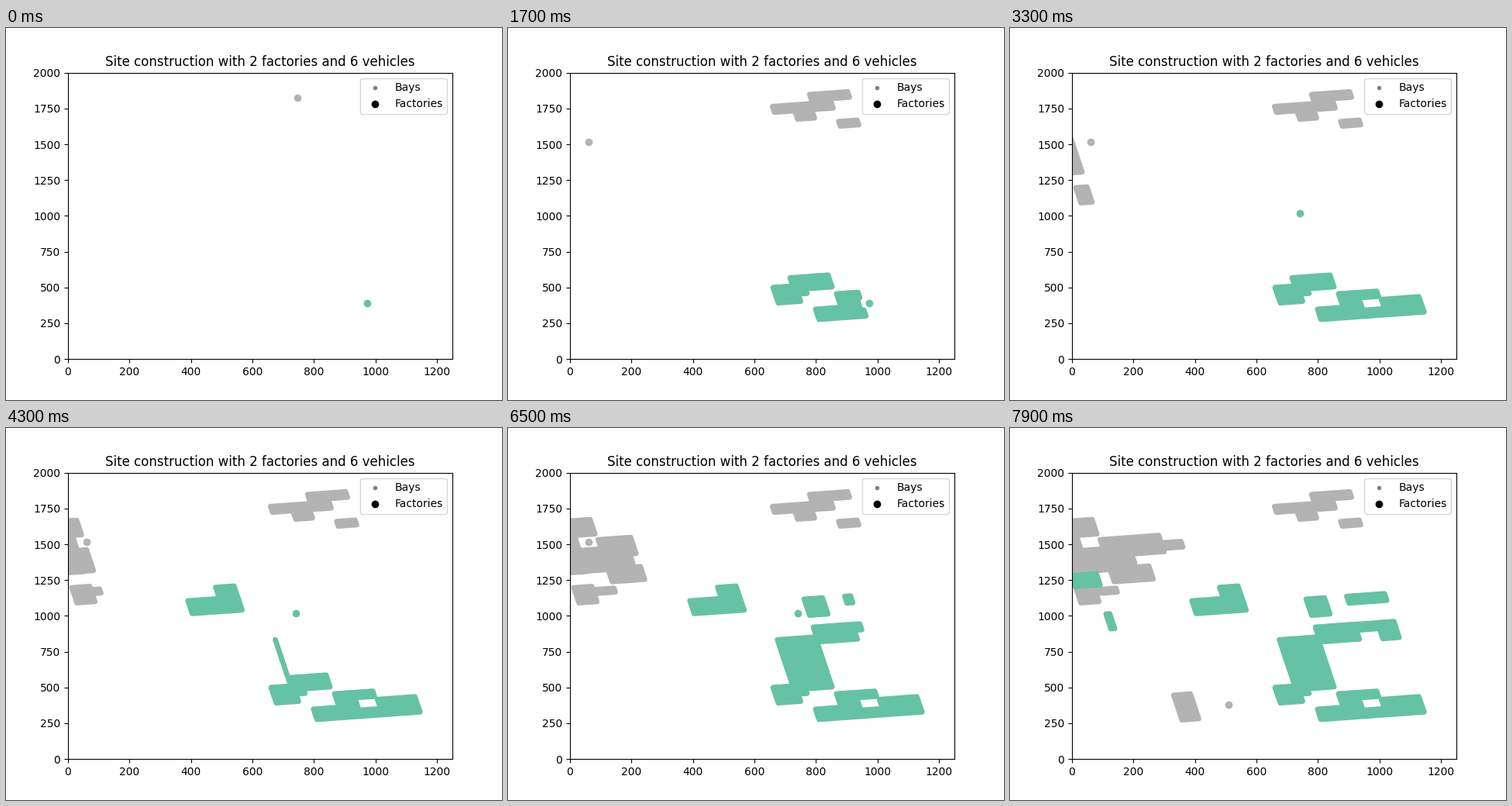
Recreate the animation shown at these times as a matplotlib script. Size 640 by 480 pixels, loop 8000 ms.

```python
import numpy as np
import matplotlib.pyplot as plt
from matplotlib.animation import FuncAnimation
from matplotlib.patches import Rectangle
from matplotlib.transforms import Affine2D

FRAMES, INTERVAL = 80, 100
GRAY, GREEN = "#b3b3b3", "#66c2a5"
TILT = 0.155    # slope of the building rows
CELL = 65.5     # width of one grid column

fig, ax = plt.subplots(figsize=(6.4, 4.8), dpi=100)
ax.set_title("Site construction with 2 factories and 6 vehicles")
ax.scatter([], [], marker=".", color="gray", label="Bays")
ax.scatter([], [], color="black", label="Factories")
ax.legend(loc="upper right")

# All bays lie on one tilted grid: along the rows, then up the columns
scale = 1 / (1 + TILT ** 2)
grid = Affine2D.from_values(1, TILT, -TILT, 1, 0, 0).scale(scale) + ax.transData
sites = []


def add_site(color, factory, stay, origin, front, strips):
    """One factory; a front sweeps its columns and uncovers the strips.

    front: (frame, column) key points; strips: (column, span, top, height).
    """
    dot = ax.scatter(*factory, color=color, zorder=2)
    patches = []
    for col, span, top, height in strips:
        patch = Rectangle((origin + CELL * col, top - height), 0, height,
                          transform=grid, facecolor=color, edgecolor=color,
                          linewidth=4.5, joinstyle="round")
        ax.add_patch(patch)
        patches.append((patch, col, span))
    sites.append((dot, stay, front, patches))


add_site(GRAY, (747, 1825), (0, 15), 17, [(0.5, 14), (9, 16.8), (14, 18)], [
    (13.96, 3, 1663, 44),
    (15, 0.87, 1635, 76),
    (16, 1.95, 1728, 42),
    (17, 0.95, 1525, 36),
])
add_site(GRAY, (61, 1515), (15, 75), 1,
         [(18, 2.4), (43, 4.37), (65, 6.67), (74, 9)], [
    (2.4, 1.5, 1608, 308),
    (3, 0.93, 1196, 111),
    (3.33, 1.62, 1664, 106),
    (3.75, 1.25, 1172, 30),
    (3.9, 1.1, 1453, 150),
    (5, 3, 1519, 118),
    (5, 1.35, 1416, 78),
    (5, 2, 1310, 94),
    (8, 1, 1466, 42),
])
add_site(GRAY, (510, 380), (75, 80), 1, [(75.5, 6), (79, 6.95)], [
    (6.08, 0.87, 396, 179),
])
add_site(GREEN, (973, 390), (0, 32), 17, [(0.5, 11), (9, 13.4), (30, 18)], [
    (11, 1.15, 398, 112),
    (11, 1.6, 398, 60),
    (12, 1.95, 458, 87),
    (12.75, 5.25, 196, 46),
    (12.75, 1.4, 226, 60),
    (14.05, 0.95, 322, 140),
    (14.05, 1.95, 322, 40),
    (16.08, 1.92, 262, 108),
])
add_site(GREEN, (741, 1020), (32, 74), 17,
         [(33.5, 8.2), (42, 11), (43, 12), (55, 14), (65, 16.37), (73, 18)], [
    (8.3, 2.55, 1046, 94),
    (9.9, 0.95, 1126, 172),
    (12, 1.95, 730, 255),
    (14, 0.95, 1000, 118),
    (14, 4, 799, 44),
    (14, 2, 799, 107),
    (16.06, 1.94, 999, 51),
    (17.15, 0.85, 799, 116),
])
add_site(GREEN, (-200, 1100), (74, 80), 1, [(74.5, 3), (79, 4.27)], [
    (3, 1.27, 1283, 82),
    (4.06, 0.21, 997, 108),
])

ax.set_xlim(0, 1250)
ax.set_ylim(0, 2000)


def update(frame):
    artists = []
    for dot, (opens, closes), front, patches in sites:
        dot.set_visible(opens <= frame < closes)
        times, cols = zip(*front)
        reach = np.interp(frame, times, cols) + 1e-6
        for patch, col, span in patches:
            patch.set_visible(frame >= times[0] and reach >= col)
            patch.set_width(CELL * np.clip(reach - col, 0.01, span))
            artists.append(patch)
        artists.append(dot)
    return artists


anim = FuncAnimation(fig, update, frames=FRAMES, interval=INTERVAL,
                     repeat=True, repeat_delay=0)
plt.show()
```
